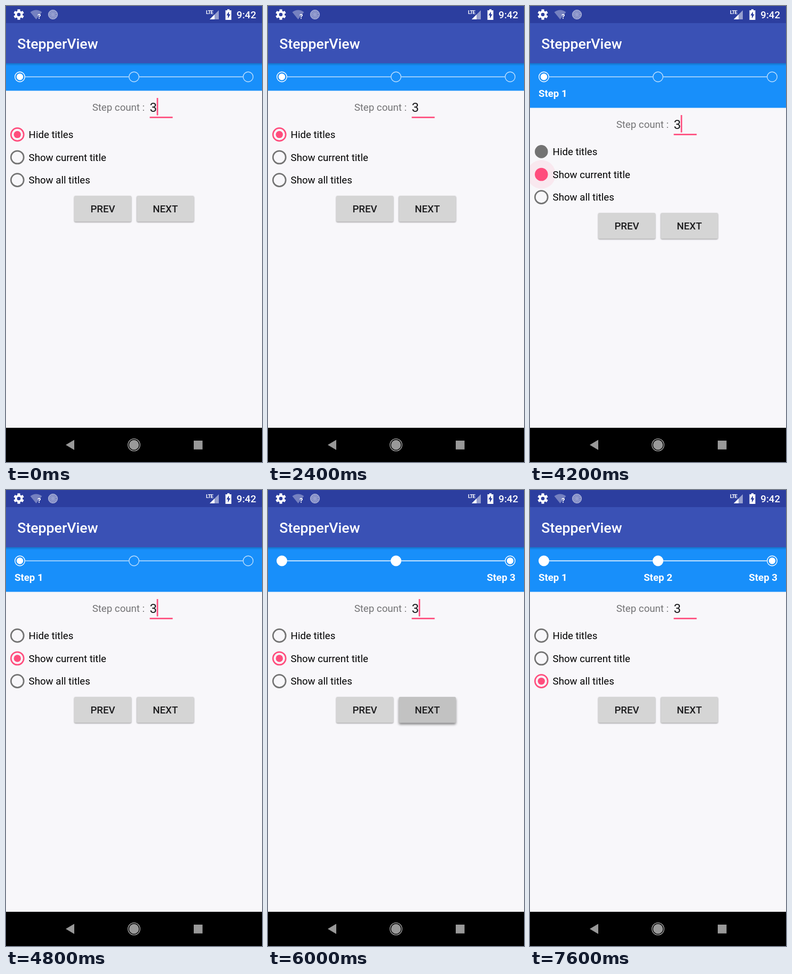
Write an HTML page that moves like this. It is 480 px wide and 853 px high and loops after 8 s.

```html
<!DOCTYPE html>
<html lang="en">
<head>
<meta charset="utf-8">
<style>
  html, body { margin: 0; width: 100%; height: 100%; overflow: hidden; background: #f8f7fa; }
  svg { display: block; width: 480px; height: 853px; font: 18.67px Roboto, sans-serif; }
  .medium { font-weight: 500; }
  .bold { font-weight: 700; }
  .button { fill: #d5d5d5; filter: drop-shadow(0 1.3px 1.3px #0006); }
  .lifted { filter: drop-shadow(0 3px 2px #0007); }
</style>
</head>
<body>
<svg viewBox="0 0 480 853">
  <defs>
    <linearGradient id="shade" x2="0" y2="1">
      <stop stop-opacity=".2"/><stop offset="1" stop-opacity="0"/>
    </linearGradient>
  </defs>
  <rect width="480" height="853" fill="#f8f7fa"/>
  <g id="screen"></g>
  <rect y="107" width="480" height="5" fill="url(#shade)"/>
  <rect width="480" height="107" fill="#3a51b5"/>
  <rect width="480" height="32" fill="#2c3e9f"/>
  <text class="medium" x="21.3" y="79.5" font-size="26.67" fill="#fff">StepperView</text>

  <!-- status bar -->
  <g fill="#fff">
    <g transform="translate(24 16)">
      <path d="M0-9.7V9.7M-8.4-4.85L8.4 4.85M-8.4 4.85L8.4-4.85" stroke="#fff" stroke-width="5"/>
      <circle r="7.2"/><circle r="3.3" fill="#2c3e9f"/>
    </g>
    <path d="M45.5 11.5Q56.5 3.5 67.5 11.5L56.5 25Z" opacity=".35"/>
    <text class="bold" x="59" y="24" font-size="13">?</text>
    <circle cx="88" cy="16" r="9" opacity=".5"/>
    <circle cx="88" cy="16" r="8.5" fill="none" stroke="#fff" stroke-opacity=".7" stroke-dasharray="1 1"/>
    <circle cx="88" cy="16" r="5.5" fill="none" stroke="#2c3e9f" stroke-opacity=".3" stroke-width="5" stroke-dasharray="1 1.5"/>
    <path d="M399 8V25H382Z" opacity=".5"/>
    <path d="M391 16V25H382Z"/>
    <text class="bold" x="375" y="14.5" font-size="9.5" letter-spacing="-.8">LTE</text>
    <path d="M415 6h4v2h3.5v18h-11V8h3.5z"/>
    <path d="M418 10.5v5h2.7l-4.7 8v-6h-2.7z" fill="#2c3e9f"/>
    <text class="medium" x="432.3" y="23">9:42</text>
  </g>

  <!-- navigation bar -->
  <rect y="789" width="480" height="64"/>
  <g fill="#999">
    <path d="M112 821L128 811.5V830.5Z"/>
    <circle cx="240" cy="821" r="9.2"/>
    <circle cx="240" cy="821" r="11.3" fill="none" stroke="#aaa" stroke-width="1.3"/>
    <rect x="352" y="813" width="16.5" height="16.5"/>
  </g>
</svg>
<script>
const LOOP = 8000, TICK = 200, ACCENT = '#ff4d7d', GRAY = '#737373';
const screen = document.getElementById('screen');

const cursorToggles = [400, 800, 1400, 1800, 2400, 2800, 3400, 3800, 4400, 4800, 5400, 6000, 6600, 7200, 7600];
const stepTimes = [5400, 6000];
const modeTimes = [4200, 7200];
const buttonShade = { 5200: .05, 5400: .09, 5600: .05, 5800: .01, 6000: .09, 6200: .06, 6400: .02 };
const rippleColor = { 4000: '#0000000a', 4200: '#ff4d7d17', 4400: '#ff4d7d0a' };
const buttonPresses = [5200, 6000];

const passed = (times, t) => times.filter(at => at <= t).length;
const text = (x, y, label, attrs = '') => `<text x="${x}" y="${y}" ${attrs}>${label}</text>`;
const circle = (x, y, r, attrs) => `<circle cx="${x}" cy="${y}" r="${r}" ${attrs}/>`;

function stepper(step, mode) {
  const anchors = ['start', 'middle', 'end'], labelX = [16, 240, 464];
  let out = `<rect y="107" width="480" height="${mode ? 83.5 : 51.5}" fill="#188ffa"/>`;
  for (let i = 0; i < 3; i++) {
    const x = 26 + 214 * i, alpha = i <= step ? 1 : .72;
    if (i < 2) out += `<path d="M${x + 10} 132.5h194" stroke="#fff" stroke-width="1.33" opacity="${i < step ? 1 : .75}"/>`;
    out += circle(x, 132.5, 9.3, `fill="${i < step ? '#fff' : 'none'}" stroke="#fff" stroke-width="1.4" opacity="${alpha}"`);
    if (i === step) out += circle(x, 132.5, 6.2, 'fill="#fff"');
    if (mode === 2 || mode === 1 && i === step)
      out += text(labelX[i], 169.5, `Step ${i + 1}`, `class="bold" fill="#fff" text-anchor="${anchors[i]}"`);
  }
  return out;
}

// progress: 0 is a solid disc, 1 is the settled ring
function radio(index, label, checked, progress) {
  const x = 21.3, y = 240.4 + 42.6 * index, color = checked ? ACCENT : GRAY;
  const outer = 12.3 + progress, inner = checked ? 9 + 1.6 * progress : 10.6 * progress;
  return circle(x, y, (outer + inner) / 2, `fill="none" stroke="${color}" stroke-width="${outer - inner}"`)
    + (checked ? circle(x, y, 10 - 3.3 * progress, `fill="${color}"`) : '')
    + text(42.6, y + 6.8, label);
}

function button(x, label, shade = 0, lifted = false) {
  const box = `x="${x}" y="355" width="107" height="48.5" rx="2.5"`;
  return `<rect ${box} class="button ${lifted ? 'lifted' : ''}"/><rect ${box} opacity="${shade}"/>`
    + text(x + 53.5, 386.3, label, 'class="medium" text-anchor="middle" fill="#1c1c1e"');
}

function render(t) {
  const mode = passed(modeTimes, t), step = passed(stepTimes, t);
  const cursorOn = passed(cursorToggles, t) % 2 === 0;
  const progress = mode ? Math.min(1, (t - modeTimes[mode - 1]) / 400) : 1;
  const radios = ['Hide titles', 'Show current title', 'Show all titles'].map((label, i) =>
    radio(i, label, i === mode, i === mode || i === mode - 1 ? progress : 1));
  screen.innerHTML = stepper(step, mode) + `<g transform="translate(0 ${mode ? 32 : 0})">`
    + text(161.7, 196, 'Step count :', 'fill="#737375"')
    + text(269.6, 198, '3', 'font-size="24" fill="#1c1c1e"')
    + `<rect x="269.5" y="207" width="43" height="2.7" fill="${ACCENT}"/>`
    + (cursorOn ? `<rect x="282.6" y="172" width="2.7" height="32.5" fill="${ACCENT}"/>` : '')
    + circle(21.3, 283, 26.7, `fill="${rippleColor[t] || 'none'}"`)
    + radios.join('')
    + button(128, 'PREV')
    + button(245.3, 'NEXT', buttonShade[t], buttonPresses.includes(t))
    + '</g>';
}

let shown = -1;
function frame(now) {
  const t = Math.floor(now % LOOP / TICK) * TICK;
  if (t !== shown) render(shown = t);
  requestAnimationFrame(frame);
}
frame(performance.now());
</script>
</body>
</html>
```
